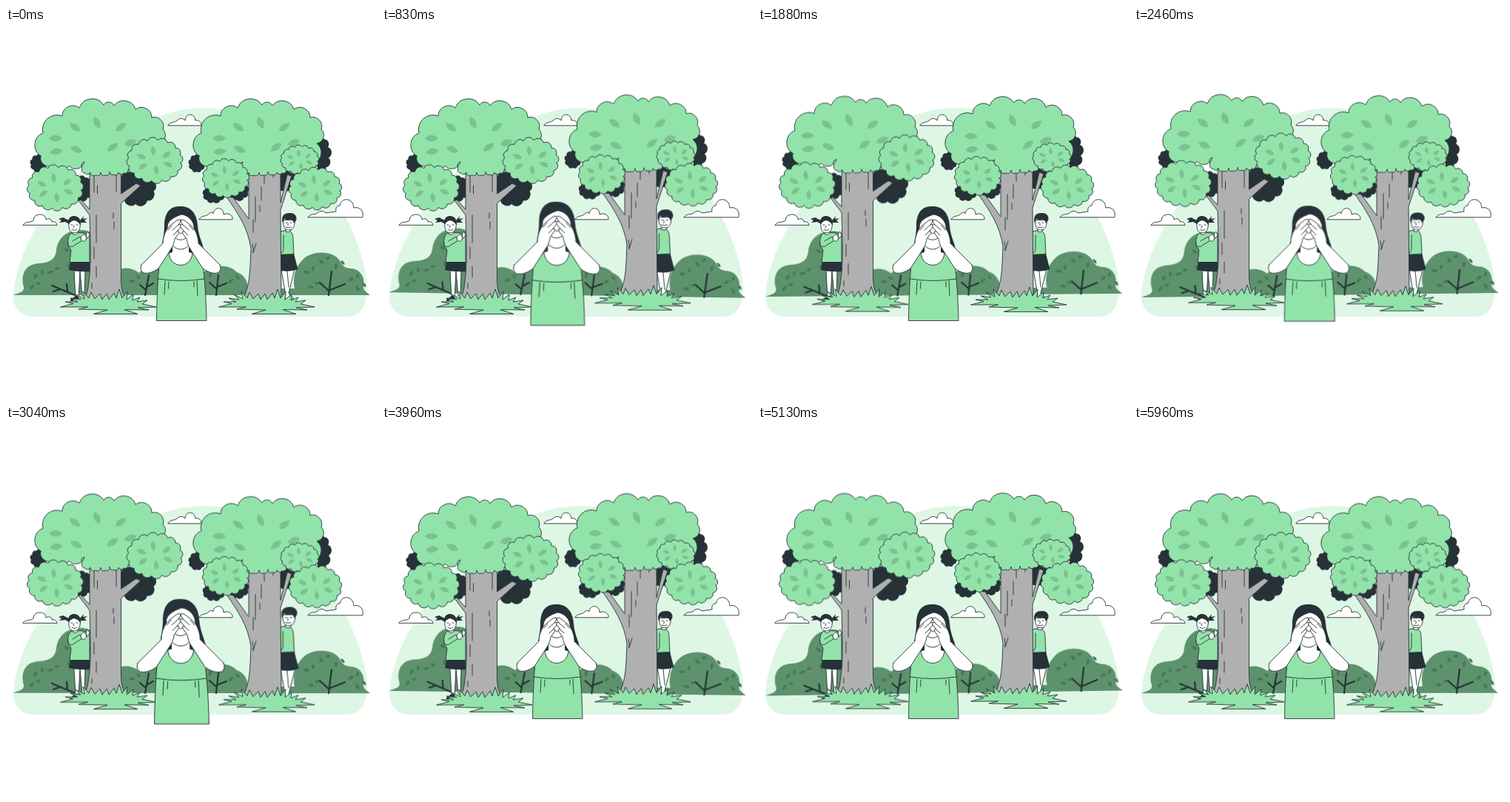
Animation of 500 by 500 pixels, one loop 6 s. Source, as an HTML page:

```html
<!DOCTYPE html>
<html lang="en">
<head>
<meta charset="utf-8">
<title>Hide and seek</title>
<style>
html, body { margin: 0; width: 100%; height: 100%; overflow: hidden; background: #fff; }
svg { display: block; width: 100vw; height: 100vh; }
.ink { stroke: #263238; stroke-width: .9; stroke-linejoin: round; stroke-linecap: round; }
.line { fill: none; }
.green { fill: #92e3a9; }
.leaf { fill: #7cc190; }
.dark { fill: #263238; }
.white { fill: #fff; }
.bark { fill: #b0b0b0; }
.bush { fill: #5d926d; }
.bushleaf { fill: #4a7758; }
.twig { fill: none; stroke: #263238; stroke-width: 2.2; stroke-linecap: round; stroke-linejoin: round; }

.bushes { transform-origin: 251px 317px; animation: wind 3s linear infinite; }
.tree-l { animation: late-float 6s linear infinite; }
.tree-r { animation: float 1.5s linear infinite; }
.beat { animation: beat 6s linear infinite; }
.woman { transform-origin: 236px 318px; }
.boy { transform-origin: 383px 308px; }

@keyframes wind {
  0%, 100% { transform: rotate(0deg); }
  25% { transform: rotate(1deg); }
  75% { transform: rotate(-1deg); }
}
@keyframes float {
  0%, 100% { transform: translateY(0); }
  50% { transform: translateY(-6px); }
}
/* one second of rest, then a three second float, cut off by the loop */
@keyframes late-float {
  0%, 16.667%, 66.667% { transform: translateY(0); }
  41.667%, 91.667% { transform: translateY(-6px); }
  100% { transform: translateY(-4px); }
}
@keyframes beat {
  0%, 30%, 40%, 60%, 100% { transform: scale(1); }
  10%, 50% { transform: scale(1.1); }
}
</style>
</head>
<body>
<svg viewBox="0 0 500 500" xmlns="http://www.w3.org/2000/svg">
  <defs>
    <path id="grass" class="ink green" d="M74 377 L91 372.500 L80 370 L97 370 L87 365 L101 367 L94 360 L106 366 L104 356 L112 365 L115 357 L120 366 L127 359 L130 367 L136 359 L139 367 L146 358 L149 365 L153 353 L157 365 L164 356 L163 367 L172 360 L171 368 L181 364 L177 370 L191 368 L184 373 L203 377 L178 378 L193 381 L160 380.500 L178 386.500 L118 386.500 L137 381 L98 380 L110 377Z"/>
  </defs>

  <path fill="#def7e5" d="M10 360 C14 310 45 250 90 205 C130 165 190 108 266 108 C340 108 400 150 440 220 C468 268 486 312 488 350 C488 375 480 390 460 390 H38 C20 390 9 378 10 360Z"/>

  <g class="ink white">
    <path d="M23 266 C27 260 34 264 37 260 C37 254 42 252 46 252 C51 252 54 255 54 259 C59 256 62 259 62 262 C66 261 68 263 69 266Z"/>
    <path d="M219 131.500 C222 126 228 128 231 125 C235 121 240 122 242 125 C242 115 255 114 256 125 C261 124 264 127 264 131.500Z"/>
    <path d="M261 258.500 C264 253 270 255 273 252 C276 248 279 249 280 251 C281 241 294 241 294 252 C300 249 307 253 306 258.500Z"/>
    <path d="M408 255.500 C412 250 418 253 421 250 C424 246 430 247 432 250 L446 248 C445 242 448 240 451 240 C452 229 469 228 470 243 C478 241 484 247 482 255.500Z"/>
  </g>

  <g class="bushes">
    <path class="bush" d="M10 361 C15 358 25 358 24 350 C20 337 23 319 45 318 C60 317 67 312 68 300 C70 284 82 273 101 273 C126 273 140 300 150 328 C160 322 171 324 180 331 C190 318 214 316 226 328 C245 340 258 333 270 328 C290 317 305 322 312 330 C322 333 327 343 327 352 L390 352 C386 330 396 318 402 312 C414 300 444 300 452 316 C455 323 461 325 468 325 C480 327 485 338 483 348 C482 355 488 357 492 361Z"/>
    <g id="bushLeaves" class="bushleaf"></g>
    <path class="twig" d="M93 361 L62 348 M83 356 L82 346 M73 353 L64 356"/>
    <path class="twig" d="M188 361 L193 334 M189 354 L181 347 M190 350 L199 345"/>
    <path class="twig" d="M284 361 L287 334 M285 353 L275 344 M285 350 L298 345"/>
    <path class="twig" d="M436 361 L440 329 M437 356 L424 344 M438 354 L458 346"/>
  </g>

  <g class="girl">
    <path class="dark" d="M85 260 L77 256 L71 258 L75 260 L72 263 L80 262 L84 264Z M100 260 L105 254 L104 258 L110 257 L106 260 L109 263 L101 263Z"/>
    <path class="ink white" d="M92 328 L94 364 H98 L100 328 M100 328 L103 362 H106 L107 328"/>
    <path class="dark" d="M94 362 L87 367 Q86 370 90 369 L98 366 V362Z"/>
    <path class="ink green" d="M89 277 C84 279 83 288 84 294 L88 300 L86 317 H113 V280 C108 277 100 276 96 277Z"/>
    <path class="dark" d="M87 316 H113 V329 Q98 330 85 327Z"/>
    <path class="ink white" d="M90 274 V278 Q94 281 97 277 V273"/>
    <path class="ink white" d="M85 264 C84 272 87 277 92 277 C98 277 101 271 100 264 C99 257 86 257 85 264Z"/>
    <path class="dark" d="M84 266 C83 256 88 254 92 254 C98 254 102 259 101 267 C99 263 96 261 92 260 C88 261 86 263 84 266Z"/>
    <path class="ink line" d="M88 266 h2 M95 266 h2 M92 267 l-1 3 M89 272 Q92 275 96 272"/>
    <path class="ink green" d="M84 290 C83 296 89 297 92 294 L103 287 L100 282 L90 288"/>
    <path class="ink white" d="M101 283 C103 279 106 278 109 280 L108 286 Q106 290 102 287Z M107 280 L111 275 L113 280 L110 284Z"/>
  </g>

  <g class="beat boy">
    <path class="ink white" d="M372 326 L378 361 Q374 364 377 366 L388 366 Q389 363 384 362 L382 358 L390 326Z"/>
    <path class="ink line" d="M380 328 L382 350"/>
    <path class="ink green" d="M371 275 L380 273 C386 274 388 279 388 286 L389 307 H368Z"/>
    <path class="dark" d="M368 306 L389 305 L394.500 326 Q382 331 367 327Z"/>
    <path class="ink white" d="M378 270 V275 Q382 277 385 274 V270"/>
    <path class="ink white" d="M375 260 C374 268 377 273 382 273 C388 273 391 267 390 260Z"/>
    <path class="dark" d="M374 264 C371 254 376 250 383 250 C391 249 394 256 392 260 L389 264 C388 260 386 258 383 259 C379 260 377 258 376 258Z"/>
    <path class="ink line" d="M378 263 h2 M384 263 h2 M381 264 v3 M378 269 Q381 271 385 269 M375 280 L375 299 Q373 306 370 304"/>
  </g>

  <g id="treeL" class="tree-l"></g>
  <g id="treeR" class="tree-r"></g>

  <g class="beat woman">
    <path class="dark" d="M236 241 C220 240 214 252 214 267 C214 282 209 292 211 306 L268 306 C268 294 260 283 259 267 C258 251 250 241 236 241Z"/>
    <path class="white" d="M225 288 L225 303 L218 305 L225 326 H249 L254 305 L247 303 V288Z"/>
    <path class="ink green" d="M220 304 C222 326 250 326 252 304 L262 303 C267 318 270 352 271 395.500 H203.500 C204 360 206 320 209 304Z"/>
    <path class="ink line" d="M206 339 Q236 344 268 339 M215 342 L214 360 M220 343 L219.500 352 M258 342 L259 362 M254 343 V350"/>
    <path class="ink white" d="M218 268 C217 286 225 299 236 299 C247 299 255 286 254 268 C252 256 241 252 237 252 C232 254 219 258 218 268Z"/>
    <path class="ink line" d="M229 284 Q236 289 243 284 M234.500 277 Q236 279 238 277"/>
    <g id="arm">
      <path class="ink white" d="M183 320 L212 291 C212 282 216 272 222 267 L231 260 Q237 257 235.500 262 L233 266 Q237 264 236 269 L231 275 Q235 273 233 278 L228 285 C227 290 226 294 224 297 L206 325 Q195 333 186 331 Q180 328 183 320Z"/>
      <path class="ink line" d="M233 266 L225 273 M231 275 L226 280 M224 267 L219 273"/>
    </g>
    <use href="#arm" transform="matrix(-1 0 0 1 472 0)"/>
  </g>
</svg>

<script>
const $ = id => document.getElementById(id);
const path = (cls, d) => `<path class="${cls}" d="${d}"/>`;

// arcs bulging outwards between clockwise points
function scallop(pts) {
  let d = `M${pts[0]}`;
  pts.forEach((p, i) => {
    const q = pts[(i + 1) % pts.length];
    const r = Math.hypot(q[0] - p[0], q[1] - p[1]) * .56;
    d += `A${r} ${r} 0 0 1 ${q}`;
  });
  return d + 'Z';
}

function ring(cx, cy, rx, ry, n) {
  return scallop(Array.from({ length: n }, (_, i) => {
    const a = (i + .3) / n * Math.PI * 2;
    return [cx + rx * Math.cos(a), cy + ry * Math.sin(a)];
  }));
}

function leaf(cls, x, y, len, deg) {
  const h = len / 2, w = len * .32;
  return `<path class="${cls}" transform="translate(${x} ${y}) rotate(${deg})" d="M${-h} 0Q0 ${-w * 1.5} ${h} 0Q0 ${w * 1.5} ${-h} 0Z"/>`;
}

function smallCrown(cx, cy, rx, ry) {
  let out = path('ink green', ring(cx, cy, rx - 2.5, ry - 2.5, 16));
  for (let i = 0; i < 6; i++) {
    const deg = i * 60 + 24, a = deg * Math.PI / 180;
    out += leaf('leaf', cx + rx * .52 * Math.cos(a), cy + ry * .44 * Math.sin(a), rx * .36, deg);
  }
  return out;
}

const outline = [
  [47, 173], [50, 142], [76, 119], [99, 108], [132, 104], [146, 105], [175, 110],
  [197, 121], [212, 137], [206, 156], [200, 184], [165, 191], [159, 196], [152, 195],
  [146, 198], [140, 194], [134, 199], [128, 195], [121, 199], [114, 195], [107, 196],
  [103, 189], [106, 181], [85, 186], [62, 186]
];
const crownLeaves = [
  [93, 134, 35], [123, 128, 65], [155, 134, -35], [67, 149, 0],
  [68, 167, -10], [95, 164, 25], [144, 161, -35], [168, 155, -20]
];

function bigCrown(dx, leafDx) {
  return path('ink green', scallop(outline.map(([x, y]) => [x + dx, y]))) +
    crownLeaves.map(([x, y, deg]) => leaf('leaf', x + leafDx, y, 18, deg)).join('');
}

function tree({ dx, leafDx, shade, wood, lines, crowns }) {
  return shade.map(s => path('dark', ring(...s, 9))).join('') +
    path('ink bark', wood) + path('ink line', lines) +
    bigCrown(dx, leafDx) + crowns.map(c => smallCrown(...c)).join('') +
    `<use href="#grass" x="${dx}"/>`;
}

$('treeL').innerHTML = tree({
  dx: 0, leafDx: 0,
  shade: [[44, 183, 10, 11], [102, 217, 13, 16], [176, 216, 24, 22]],
  wood: 'M113 188 V245 L101 232 L98 233 L113 253 C114 290 115 325 112 342 C111 354 109 361 105 367 H163 C157 360 155.500 350 155.500 338 V237 L182 213 L176 210 L155.500 224 V188Z',
  lines: 'M119 199 V222 M123.500 213 V224 M149 197 V221 M145 250 V257 M146 262 V271 M122 253 V290 M119 296 V312 M122 322 V337 M116 345 V352',
  crowns: [[66.5, 216, 38, 30], [201, 179, 38, 30]]
});

$('treeR').innerHTML = tree({
  dx: 214, leafDx: 221,
  shade: [[258, 183, 10, 11], [281, 224, 14, 11], [312, 219, 15, 13], [427, 171, 9, 22], [377, 202, 14, 17]],
  wood: 'M328 188 L328 258 L307 229 L298 228 C313 250 327 270 331 298 C330 320 330 340 325 354 Q323 362 319 367 H372 L371 246 L386 200 L380 198 L371 236 V188Z',
  lines: 'M337 228 V262 M334 259 V276 M345 215 V233 M349 195 V210 M361 196 V202 M333 292 Q336 306 333 302 M338 291 L334 304 M343 240 V248',
  crowns: [[297, 203, 32, 26], [397, 178, 27, 20], [418, 217, 36, 28]]
});

const tufts = [[40, 335], [60, 330], [82, 300], [85, 322], [35, 350], [170, 342], [208, 342], [276, 334], [304, 342], [406, 330], [426, 316], [446, 322], [466, 340], [412, 350], [475, 352]];
$('bushLeaves').innerHTML = tufts.map(([x, y], i) =>
  leaf('bushleaf', x, y, 9, i * 47 % 180 - 60) + leaf('bushleaf', x + 9, y - 5, 8, i * 61 % 180 - 80)).join('');
</script>
</body>
</html>
```
